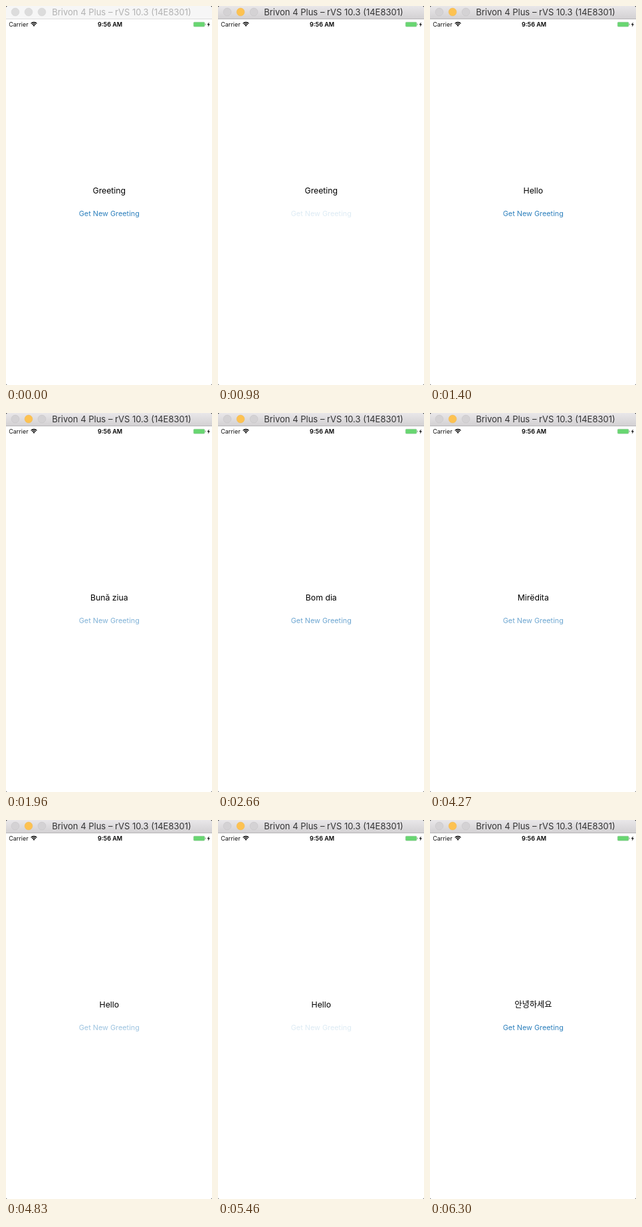
Write an HTML page with a canvas that moves like this. It is 310 px wide and 570 px high and loops after 6510 ms.

```html
<!DOCTYPE html>
<html lang="en">
<head>
<meta charset="utf-8">
<title>Greeting</title>
<style>
  html, body { margin: 0; width: 100%; height: 100%; overflow: hidden; background: #fff; }
  canvas { display: block; width: 310px; height: 570px; }
</style>
</head>
<body>
<canvas id="stage"></canvas>
<script>
const W = 310, H = 570, LOOP = 6510, STEP = 70;
const FADE = 350, PRESSED = 0.16, ACTIVE_FROM = 980;
const SANS = 'Inter, "Noto Sans CJK KR", "Noto Sans CJK", sans-serif';

const taps = [
  { press: 980, release: 1050, greeting: 'Hello' },
  { press: 1750, release: 1850, greeting: 'Bună ziua' },
  { press: 2450, release: 2520, greeting: 'Bom dia' },
  { press: 3010, release: 3283, greeting: 'Bom dia' },
  { press: 4130, release: 4131, greeting: 'Mirëdita' },
  { press: 4690, release: 4760, greeting: 'Hello' },
  { press: 5460, release: 5490, greeting: '안녕하세요' }
];

const canvas = document.getElementById('stage');
const ctx = canvas.getContext('2d');
const ratio = window.devicePixelRatio || 1;
canvas.width = W * ratio;
canvas.height = H * ratio;

function text(str, x, y, size, color, { align = 'center', weight = 400 } = {}) {
  ctx.font = `${weight} ${size}px ${SANS}`;
  ctx.textAlign = align;
  ctx.fillStyle = color;
  ctx.fillText(str, x, y);
}

function light(x, fill, edge) {
  ctx.beginPath();
  ctx.arc(x, 9, 5.9, 0, Math.PI * 2);
  ctx.fillStyle = fill;
  ctx.fill();
  ctx.strokeStyle = edge;
  ctx.lineWidth = 0.6;
  ctx.stroke();
}

function titleBar(active) {
  const shade = ctx.createLinearGradient(0, 0, 0, 19);
  shade.addColorStop(0, active ? '#e9e7e9' : '#f6f6f6');
  shade.addColorStop(1, active ? '#d3d1d3' : '#f6f6f6');
  ctx.fillStyle = shade;
  ctx.fillRect(0, 0, W, 20);
  ctx.fillStyle = active ? '#b8b6b8' : '#dcdcdc';
  ctx.fillRect(0, 19, W, 1);

  const grey = active ? ['#d4d2d4', '#c6c4c6'] : ['#dcdcdc', '#d4d4d4'];
  light(14, ...grey);
  light(34, ...(active ? ['#fdc251', '#efba5c'] : grey));
  light(54, ...grey);
  text('Brivon 4 Plus – rVS 10.3 (14E8301)', 174, 14, 13, active ? '#333' : '#b2b2b2');
}

function wifi(x, y) {
  const from = -Math.PI * 0.75, to = -Math.PI * 0.25;
  ctx.strokeStyle = ctx.fillStyle = '#000';
  ctx.lineWidth = 1.3;
  for (const r of [6.3, 4]) {
    ctx.beginPath();
    ctx.arc(x, y, r, from, to);
    ctx.stroke();
  }
  ctx.beginPath();
  ctx.moveTo(x, y);
  ctx.arc(x, y, 2.3, from, to);
  ctx.fill();
}

function battery() {
  ctx.beginPath();
  ctx.roundRect(282.3, 24.3, 16.6, 6.8, 1.4);
  ctx.fillStyle = '#68d671';
  ctx.fill();
  ctx.strokeStyle = '#8fc596';
  ctx.lineWidth = 0.6;
  ctx.stroke();
  ctx.fillStyle = '#7d9a80';
  ctx.fillRect(299.6, 26.4, 0.9, 2.6);

  ctx.beginPath();
  [[305.8, 24.2], [302.6, 28.2], [304.6, 28.2], [303.8, 31.4], [307, 27.2], [305, 27.2]]
    .forEach(p => ctx.lineTo(...p));
  ctx.fillStyle = '#111';
  ctx.fill();
}

function statusBar() {
  text('Carrier', 4.2, 31, 9, '#111', { align: 'left' });
  wifi(42, 30.8);
  text('9:56 AM', 156.5, 31, 9, '#000', { weight: 600 });
  battery();
}

function buttonAlpha(t) {
  const tap = taps.findLast(p => t >= p.press);
  if (!tap) return 1;
  const x = Math.min(1, Math.max(0, (t - tap.release) / FADE));
  return PRESSED + (1 - PRESSED) * (1 - (1 - x) ** 2);
}

function greetingAt(t) {
  const tap = taps.findLast(p => t >= p.release);
  return tap ? tap.greeting : 'Greeting';
}

function draw(t) {
  ctx.setTransform(ratio, 0, 0, ratio, 0, 0);
  ctx.fillStyle = '#333';
  ctx.fillRect(0, 0, W, H);
  ctx.save();
  ctx.beginPath();
  ctx.roundRect(0, 0, W, H, [3.5, 3.5, 2, 2]);
  ctx.clip();
  ctx.fillStyle = '#fff';
  ctx.fillRect(0, 0, W, H);

  titleBar(t >= ACTIVE_FROM);
  statusBar();
  text(greetingAt(t), 155.3, 282, 12.25, '#000');
  ctx.globalAlpha = buttonAlpha(t);
  text('Get New Greeting', 155.3, 316, 10.85, '#2e80bd');
  ctx.restore();
}

function frame() {
  const t = performance.now() % LOOP;
  draw(Math.floor(t / STEP) * STEP);
  requestAnimationFrame(frame);
}
frame();
</script>
</body>
</html>
```
